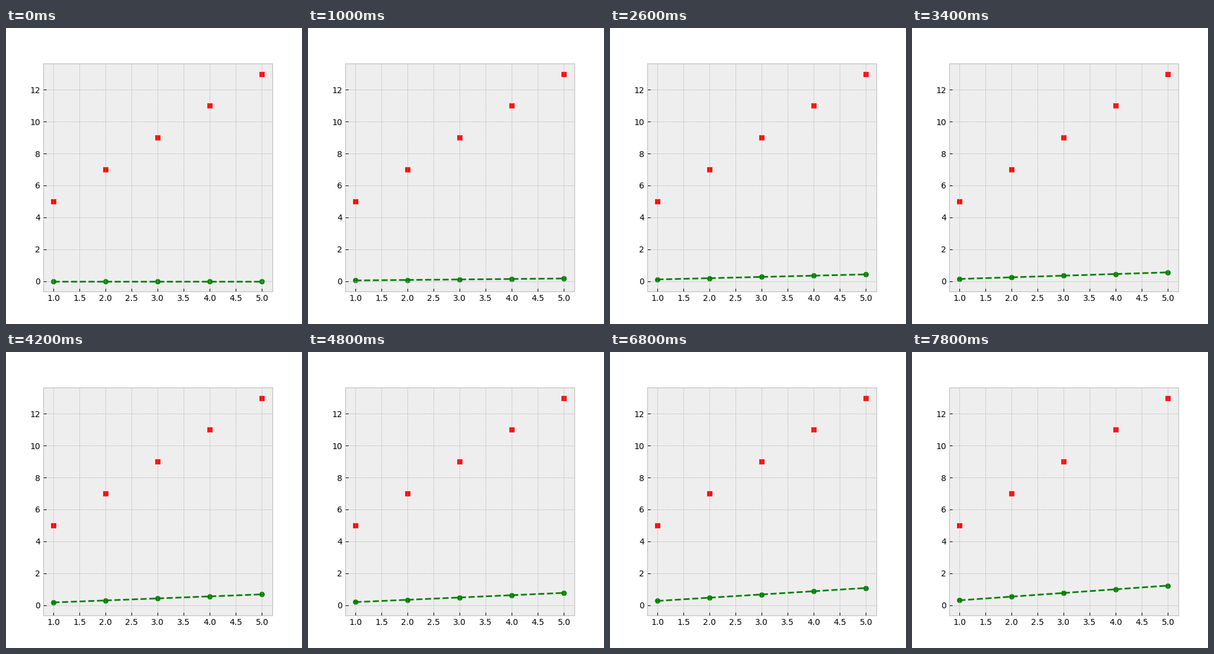
A matplotlib script for the animation above (8 s loop, 500 by 500 pixels).

```python
import numpy as np
import matplotlib.pyplot as plt
from matplotlib.animation import FuncAnimation

FRAMES = 40
INTERVAL = 200
RATE = 1e-4

plt.style.use("bmh")
plt.rcParams.update({"xtick.direction": "in", "ytick.direction": "in"})

x = np.arange(1.0, 6.0)
y = 2 * x + 3


def descend(steps):
    """Slope and offset after some steps of gradient descent from zero."""
    w = b = 0.0
    for _ in range(steps):
        err = w * x + b - y
        w, b = w - RATE * 2 * np.mean(err * x), b - RATE * 2 * np.mean(err)
    return w, b


fig, ax = plt.subplots(figsize=(5, 5), dpi=100)
ax.scatter(x, y, color="r", marker="s")
dots = ax.scatter(x, 0 * x, color="g", marker="o")
line, = ax.plot(x, 0 * x, "g--", linewidth=2)
ax.set_xlim(0.8, 5.2)
ax.set_ylim(-0.65, 13.65)


def update(i):
    w, b = descend(i)
    fit = w * x + b
    line.set_ydata(fit)
    dots.set_offsets(np.column_stack([x, fit]))
    return line, dots


def reset():
    return update(0)


anim = FuncAnimation(fig, update, frames=FRAMES, init_func=reset,
                     interval=INTERVAL, repeat=True, repeat_delay=0)
plt.show()
```
